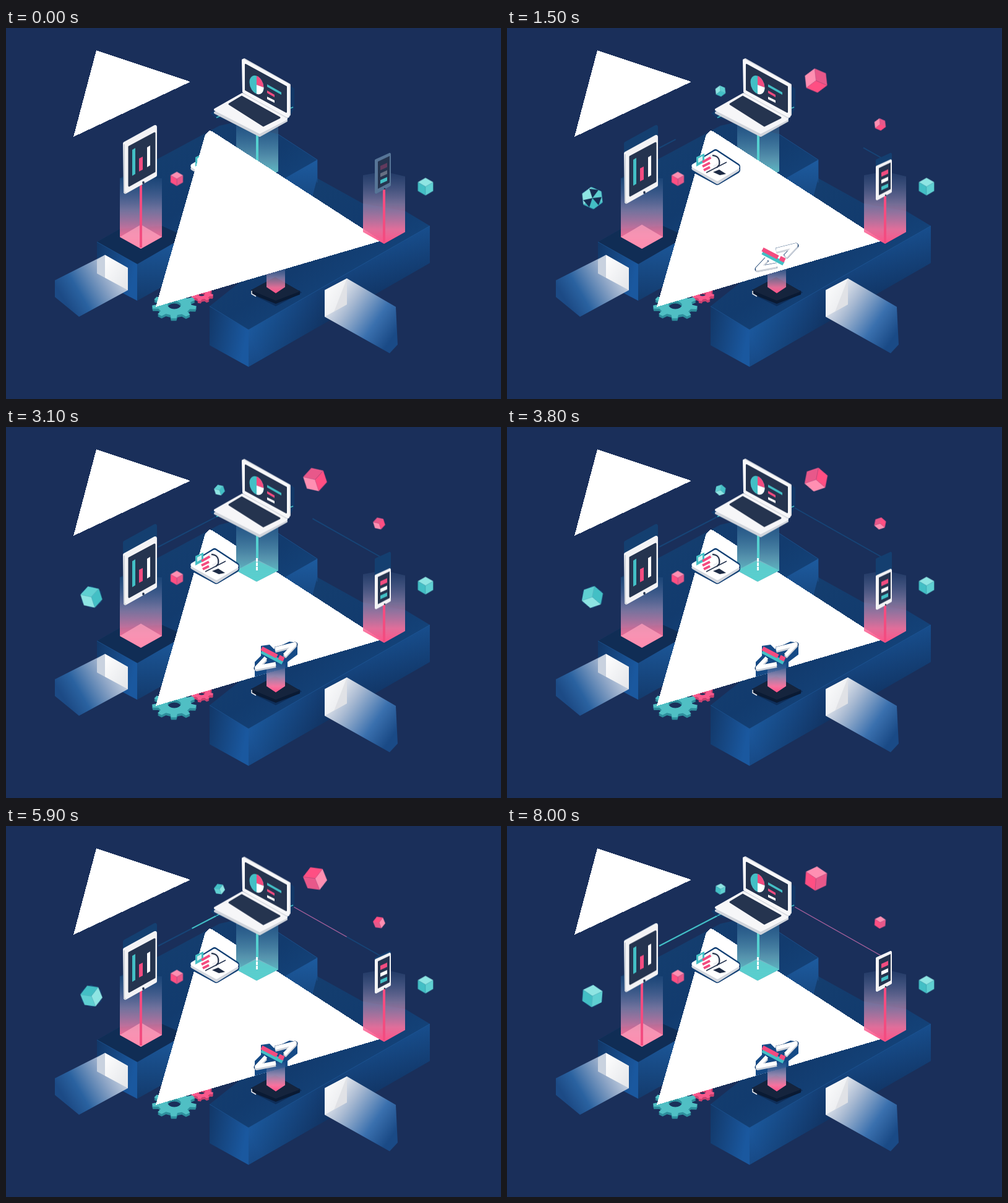
Write an HTML page that moves like this. It is 800 px wide and 600 px high and loops after 8.1 s.

```html
<!DOCTYPE html>
<html lang="en">
<head>
<meta charset="utf-8">
<title>Isometric devices</title>
<style>
html, body { margin: 0; width: 100%; height: 100%; overflow: hidden; background: #1a2f5a; }
svg { display: block; width: 800px; height: 600px; }
.anim { animation: 8100ms linear infinite; }
.step { animation: 8100ms step-end infinite; }

#laptop { animation-name: laptop; }
#tablet { animation-name: tablet; }
#phone { animation-name: phone; }
@keyframes laptop {
  0%, 100% { transform: translateY(0); }
  10% { transform: translateY(-1px); }
  18.5% { transform: translateY(0); }
  29.6% { transform: translateY(2px); }
  40% { transform: translateY(2.8px); }
  46.9% { transform: translateY(2.2px); }
  63% { transform: translateY(-.3px); }
  82.7% { transform: translateY(1.6px); }
  98.8% { transform: translateY(0); }
}
@keyframes tablet {
  0%, 100% { transform: translateY(0); }
  8.6% { transform: translateY(8.5px); }
  18.5% { transform: translateY(16px); }
  29.6% { transform: translateY(19px); }
  38% { transform: translateY(20px); }
  46.9% { transform: translateY(19px); }
  63% { transform: translateY(15.5px); }
  82.7% { transform: translateY(10.5px); }
  98.8% { transform: translateY(.3px); }
}
@keyframes phone {
  0%, 100% { transform: translateY(0); }
  8.6% { transform: translateY(4px); }
  18.5% { transform: translateY(10.5px); }
  29.6% { transform: translateY(21px); }
  38% { transform: translateY(26.5px); }
  46.9% { transform: translateY(27.5px); }
  55% { transform: translateY(18px); }
  63% { transform: translateY(8px); }
  72% { transform: translateY(3px); }
  82.7% { transform: translateY(1px); }
  98.8% { transform: translateY(0); }
}

.spin { animation-name: spin; }
@keyframes spin { to { transform: rotate(-360deg); } }

/* visibility switches */
.late { animation-name: late; }
@keyframes late { 0%, 100% { opacity: 0; } 1.234% { opacity: 1; } }
.dim { animation-name: dim; }
@keyframes dim { 0%, 100% { opacity: .3; } 1.234% { opacity: 1; } }
.tabpole { animation-name: tabpole; }
@keyframes tabpole { 0%, 100% { opacity: 1; } 1.234% { opacity: 0; } 54.3% { opacity: 1; } }
.phonepole { animation-name: phonepole; }
@keyframes phonepole { 0%, 100% { opacity: 1; } 23.4% { opacity: 0; } 34.5% { opacity: 1; } }
.front { animation-name: front; }
@keyframes front { 0%, 100% { opacity: 0; } 34.5% { opacity: 1; } }
.body { animation-name: body; }
@keyframes body { 0%, 100% { opacity: 1; } 56.8% { opacity: 0; } 67.9% { opacity: 1; } }
.halo { animation-name: halo; }
@keyframes halo { 0%, 100% { opacity: 0; } 23.4% { opacity: 1; } }
.wedge { animation-name: wedge; }
@keyframes wedge {
  0%, 100% { transform: scale(.92); }
  23.4% { transform: scale(.72); opacity: 1; }
  34.5% { transform: scale(.72); opacity: 0; }
}

/* connecting lines */
.link { fill: none; stroke-dasharray: 1 2; stroke-dashoffset: 1; }
.trailL { animation-name: trailL; }
@keyframes trailL { 0%, 10.5% { stroke-dashoffset: 1; } 18.5% { stroke-dashoffset: .74; } 29.6% { stroke-dashoffset: .37; } 41%, 100% { stroke-dashoffset: 0; } }
.trailR { animation-name: trailR; }
@keyframes trailR { 0%, 9.5% { stroke-dashoffset: 1; } 18.5% { stroke-dashoffset: .8; } 29.6% { stroke-dashoffset: .56; } 45%, 100% { stroke-dashoffset: 0; } }
.wireL { animation-name: wireL; }
@keyframes wireL { 0%, 58.8% { stroke-dashoffset: 1; } 63% { stroke-dashoffset: .86; } 82.7% { stroke-dashoffset: .21; } 90%, 100% { stroke-dashoffset: 0; } }
.wireR { animation-name: wireR; }
@keyframes wireR { 0%, 46% { stroke-dashoffset: 1; } 63% { stroke-dashoffset: .61; } 82.7% { stroke-dashoffset: .14; } 90%, 100% { stroke-dashoffset: 0; } }

.pink { --a: #ff8fb2; --b: #ff4f83; --c: #e8588a; }
.teal { --a: #8ee5e3; --b: #43bfc5; --c: #5fd0d2; }
</style>
</head>
<body>
<svg viewBox="0 0 800 600">
  <defs>
    <linearGradient id="top" x1="0" y1="0" x2="1" y2="1">
      <stop offset="0" stop-color="#16406f"/><stop offset=".5" stop-color="#123b6e"/><stop offset="1" stop-color="#17518f"/>
    </linearGradient>
    <linearGradient id="side" gradientUnits="userSpaceOnUse" x1="400" y1="510" x2="690" y2="350">
      <stop offset="0" stop-color="#1d5ea6"/><stop offset=".08" stop-color="#195596"/><stop offset=".4" stop-color="#102f5c"/><stop offset=".75" stop-color="#123c70"/><stop offset="1" stop-color="#15457e"/>
    </linearGradient>
    <linearGradient id="long" gradientUnits="userSpaceOnUse" x1="530" y1="395" x2="565" y2="460">
      <stop offset="0" stop-color="#1c5ca3"/><stop offset="1" stop-color="#102e5b"/>
    </linearGradient>
    <linearGradient id="end" x1="0" y1="0" x2="1" y2=".3">
      <stop offset="0" stop-color="#123767"/><stop offset="1" stop-color="#1a589f"/>
    </linearGradient>
    <linearGradient id="back" x1="0" y1="0" x2="0" y2="1">
      <stop offset="0" stop-color="#1d5b9f"/><stop offset="1" stop-color="#133b6d"/>
    </linearGradient>
    <linearGradient id="beamL" gradientUnits="userSpaceOnUse" x1="190" y1="385" x2="95" y2="442">
      <stop offset="0" stop-color="#dfe4ec"/><stop offset=".35" stop-color="#90a7c7"/><stop offset=".75" stop-color="#2a62a0"/><stop offset="1" stop-color="#1c4a85"/>
    </linearGradient>
    <linearGradient id="beamR" gradientUnits="userSpaceOnUse" x1="525" y1="430" x2="625" y2="500">
      <stop offset="0" stop-color="#f0f0f2"/><stop offset=".3" stop-color="#a9bad2"/><stop offset=".7" stop-color="#3a70ae"/><stop offset="1" stop-color="#1a4a86"/>
    </linearGradient>
    <linearGradient id="glowP" x1="0" y1="0" x2="0" y2="1">
      <stop offset="0" stop-color="#5d83b5" stop-opacity=".12"/><stop offset=".45" stop-color="#a58fb6" stop-opacity=".65"/><stop offset=".8" stop-color="#f8739f" stop-opacity=".9"/><stop offset="1" stop-color="#ff5287"/>
    </linearGradient>
    <linearGradient id="glowT" x1="0" y1="0" x2="0" y2="1">
      <stop offset="0" stop-color="#3d78a8" stop-opacity=".35"/><stop offset=".6" stop-color="#67a9bd" stop-opacity=".8"/><stop offset="1" stop-color="#62d6d4"/>
    </linearGradient>
    <linearGradient id="face" x1="0" y1="0" x2="1" y2="1">
      <stop offset="0" stop-color="#fff"/><stop offset="1" stop-color="#e3e5e9"/>
    </linearGradient>

    <g id="cube">
      <path fill="var(--a)" d="M0-10 8.7-5 0 0-8.7-5z"/>
      <path fill="var(--b)" d="M-8.7-5 0 0V10L-8.7 5z"/>
      <path fill="var(--c)" d="M8.7-5 0 0V10L8.7 5z"/>
    </g>

    <g id="pad" stroke-linejoin="round">
      <path d="M302 227 337 204 372 229 340 249z" fill="#d3d7de" stroke="#d3d7de" stroke-width="7"/>
      <path d="M302 223 337 202 372 225 340 244z" fill="#fff" stroke="#fff" stroke-width="7"/>
      <path d="M306 209 319 203V217L306 224z" fill="#43bfc5"/>
      <path d="M309 211 316 207V214L309 218z" fill="#d7f3f3"/>
      <path d="M316 217 330 209M316 224 328 218M318 230 328 225" stroke="#f34c80" stroke-width="4" fill="none"/>
      <path d="M329 209Q338 203 342 212T334 225" fill="none" stroke="#f1f1f4" stroke-width="6"/>
      <path d="M332 206Q345 207 343 221L339 226" fill="none" stroke="#1d2b45" stroke-width="2"/>
      <path d="M322 234 355 217" stroke="#25344f" stroke-width="1.5"/>
      <path d="M333 233 343 229 354 236 344 238z" fill="#1d2b45"/>
    </g>

    <path id="slab" d="M192 187 241 160V238L193 265z" stroke-width="6" stroke-linejoin="round"/>
    <path id="bar" d="M598 214 620 204V254L598 266z" stroke-width="4" stroke-linejoin="round"/>
    <path id="stand" d="M421 382H451V419L436 429 421 419z" fill="url(#glowP)"/>
  </defs>

  <rect width="800" height="600" fill="#1a2f5a"/>

  <!-- platform -->
  <path fill="url(#top)" d="M184 243 252 208 345 158 372 152 440 172 503 213 440 250 212 382 147 346 184 325z"/>
  <path fill="#102d55" d="M147 346 184 325 252 320 290 337 212 382z"/>
  <path fill="url(#end)" d="M147 346 212 382V441L147 407z"/>
  <path fill="url(#back)" d="M212 382 300 331V392L212 441z"/>
  <path fill="url(#back)" d="M503 213V290L400 320V272z"/>
  <path fill="url(#top)" d="M503 243 577 284 645 296 685 320 392 488 329 450 480 330z"/>
  <path fill="url(#long)" d="M392 488 685 320V380L392 548z"/>
  <path fill="url(#side)" opacity=".55" d="M392 488 685 320V380L392 548z"/>
  <path fill="url(#end)" d="M329 450 392 488V548L329 513z"/>
  <path d="M147 346 212 382M329 450 392 488 685 320M440 172 503 213V250" fill="none" stroke="#1d5797" opacity=".7"/>

  <!-- light beams -->
  <path fill="url(#beamL)" d="M160 367 197 388V424L118 467 79 435V408z"/>
  <path fill="#c9d2df" d="M147 375 160 367V404L147 397z"/>
  <path fill="url(#face)" d="M160 367 197 388V424L160 404z"/>
  <path fill="url(#beamR)" d="M515 424 551 405 630 451 633 512 620 526 515 467z"/>
  <path fill="url(#face)" d="M515 424 551 405V447L515 467z"/>
  <path fill="#d9dbe0" opacity=".6" d="M551 405V447L530 459z"/>

  <g id="gears"></g>

  <!-- code stand -->
  <path fill="#0c2850" d="M398 431 436 450 478 428 474 424z" opacity=".7"/>
  <path fill="#0a1a33" d="M396 424 435 403 475 426V431L436 446 396 430z"/>
  <path fill="#15243d" d="M396 424 435 403 475 426 436 441z"/>
  <path d="M397 425V430L404 434" fill="none" stroke="#e9edf3" stroke-width="1.5"/>
  <use href="#stand"/>

  <!-- laptop pillar, behind the sheet -->
  <path fill="url(#glowT)" d="M372 155H440V232L405 250 372 232z"/>
  <path d="M406 170V232" stroke="#55d0d0" stroke-width="4"/>
  <use href="#pad"/>

  <g fill="#fff" shape-rendering="crispEdges">
    <path d="M146 36 298 87 109 176z"/>
    <path d="M322 172 329 166 333 167 607 344 242 451z"/>
  </g>

  <!-- laptop pillar, in front -->
  <g class="step front">
    <path fill="#153f70" d="M372 160H440V232L405 250 372 232z"/>
    <path fill="#d5d7da" d="M372 232 405 214 440 232 405 250z"/>
    <g class="step body">
      <path fill="url(#glowT)" d="M372 155H440V232L405 250 372 232z"/>
      <path fill="#55cfcd" d="M372 232 405 216 440 232 405 250z" opacity=".8"/>
    </g>
    <path d="M406 170V214" stroke="#55d0d0" stroke-width="4"/>
    <path d="M405.500 212V232" stroke="#fff" stroke-width="3" stroke-dasharray="6 1"/>
  </g>

  <!-- pad and code icon over the sheet -->
  <g class="step late">
    <path d="M303 222 337 201 372 224V230L340 249 303 229z" fill="#113f74" stroke="#113f74" stroke-width="10" stroke-linejoin="round"/>
    <use href="#pad"/>
    <g class="step halo">
      <path fill="#154a86" d="M402 404V380L412 370V354L426 352 433 359 458 347 471 349V368L455 380V389z"/>
      <use href="#stand"/>
    </g>
    <g fill="none" stroke-linejoin="round">
      <g id="code">
        <path d="M420 374 405 390 436 384M435 360 467 352 450 370" stroke="#123a6b" stroke-width="9"/>
        <path d="M420 376 405 392 436 386M435 362 467 354 450 372" stroke="#cdd2da" stroke-width="6"/>
        <path d="M420 373 405 389 436 383M435 359 467 351 450 369" stroke="#fff" stroke-width="6"/>
        <path d="M413 363 447 381" stroke="#43bfc5" stroke-width="7"/>
        <path d="M413 358 438 371M441 372 449 376" stroke="#f34c80" stroke-width="7"/>
      </g>
    </g>
  </g>

  <!-- connecting lines -->
  <g stroke-width="2">
    <path class="link anim trailL" pathLength="1" stroke="#174476" d="M246 194 348 141"/>
    <path class="link anim trailR" pathLength="1" stroke="#174476" d="M605 210 460 128"/>
    <path class="link anim wireL" pathLength="1" stroke="#43bfc5" d="M348 141 246 194"/>
    <path class="link anim wireR" pathLength="1" stroke="#b35a93" stroke-width="1.300" d="M460 128 605 210"/>
  </g>

  <!-- tablet -->
  <path fill="url(#glowP)" d="M184 243H252V338L218 357 184 338z"/>
  <path fill="#ffa0bd" opacity=".75" d="M184 338 218 318 252 338 218 357z"/>
  <path class="step tabpole" d="M218 245V355" stroke="#f34c80" stroke-width="4"/>
  <use href="#slab" fill="#143f70" stroke="#143f70"/>
  <g id="tablet" class="anim">
    <use href="#slab" fill="#f3f3f5" stroke="#f3f3f5"/>
    <path d="M191 188V266L194 267" fill="none" stroke="#cfd3da" stroke-width="2"/>
    <path fill="#25344f" stroke="#25344f" stroke-width="3" stroke-linejoin="round" d="M199 192 240 170V232L199 255z"/>
    <path fill="#43bfc5" d="M204 197 209 194V236L204 239z"/>
    <path fill="#f34c80" d="M215 211 221 208V229L215 232z"/>
    <path fill="#fff" d="M228 193 233 190V222L228 225z"/>
    <ellipse cx="222" cy="250" rx="1.800" ry="2.300" fill="#25344f"/>
  </g>

  <!-- phone -->
  <path fill="url(#glowP)" d="M577 238 611 232 645 240V330L611 349 577 330z"/>
  <path class="step phonepole" d="M611 245V347" stroke="#f34c80" stroke-width="4"/>
  <use href="#bar" fill="#143f70" stroke="#143f70"/>
  <g id="phone" class="anim">
    <g class="step dim">
      <use href="#bar" fill="#f3f3f5" stroke="#f3f3f5"/>
    </g>
    <path fill="#25344f" d="M601 216 620 207V250L601 260z"/>
    <g class="step dim">
      <path fill="#f34c80" d="M605 223 616 218V225L605 230z"/>
      <path fill="#fff" d="M605 235 616 230V236L605 241z"/>
    </g>
    <path fill="#43bfc5" d="M605 246 616 241V247L605 252z"/>
    <circle cx="612" cy="260" r="1.300" fill="#25344f"/>
  </g>

  <!-- laptop -->
  <path fill="#123767" d="M330 138 350 125 360 150 340 146zM455 90 466 98V130L455 150z"/>
  <path d="M340 145 351 140M459 130 464 128" stroke="#43bfc5" stroke-width="1.500"/>
  <g id="laptop" class="anim" stroke-linejoin="round">
    <path fill="#d0d4db" stroke="#d0d4db" stroke-width="4" d="M338 137 382 112 453 150 410 174z"/>
    <path fill="#f6f6f8" stroke="#f6f6f8" stroke-width="4" d="M338 132 382 107 453 147 410 169z"/>
    <path fill="#d8dbe1" stroke="#d8dbe1" stroke-width="4" d="M385 51 458 92V140L454 144 385 104z"/>
    <path fill="#f8f8fa" stroke="#f8f8fa" stroke-width="4" d="M383 52 456 92V143L384 103z"/>
    <path fill="#25344f" stroke="#25344f" stroke-width="2" d="M387 59 453 95V136L387 100z"/>
    <path fill="#25344f" stroke="#25344f" stroke-width="3" d="M361 123 381 111 442 145 416 158z"/>
    <g transform="translate(405 92) skewY(20)">
      <ellipse rx="11.500" ry="14.500" fill="#43bfc5"/>
      <path fill="#f34c80" d="M0 0V-14.500A11.500 14.500 0 0 1 11.500 0z"/>
      <path fill="#fff" d="M0 0H11.500A11.500 14.500 0 0 1 0 14.500z"/>
    </g>
    <path fill="#43bfc5" d="M422 91 445 104V108L422 95z"/>
    <path fill="#f34c80" d="M422 101 434 108V112L422 105z"/>
    <path fill="#fff" d="M422 111 434 117V121L422 115z"/>
  </g>

  <!-- cubes -->
  <g transform="translate(276 244) scale(1.150)" class="pink"><use href="#cube"/></g>
  <g transform="translate(678 256.500) scale(1.420)" class="teal"><use href="#cube"/></g>
  <g class="step late">
    <g transform="translate(499.500 85) scale(1.960)" class="pink"><use href="#cube" class="anim spin"/></g>
    <g transform="translate(345 102) scale(.9)" class="teal"><use href="#cube" class="anim spin"/></g>
    <g transform="translate(603 156) scale(1)" class="pink"><use href="#cube" class="anim spin"/></g>
    <g transform="translate(138 275) scale(1.800)" class="teal">
      <path fill="#163c6c" d="M0-10.500 9-5V5L0 10.500-9 5V-5z"/>
      <use href="#cube" class="anim spin"/>
      <path class="step wedge" fill="#172c52" d="M0 0-3-9 6-8zM0 0 9-1 6 7zM0 0-3 9-9 2z"/>
    </g>
  </g>
</svg>
<script>
const NS = 'http://www.w3.org/2000/svg';
const gears = document.getElementById('gears');

function gearPath(cx, cy, r, teeth, hole) {
  const at = (a, k) => (cx + Math.cos(a) * r * k).toFixed(1) + ' ' + (cy + Math.sin(a) * r * k * .6).toFixed(1);
  const pts = [];
  for (let i = 0; i < teeth; i++) {
    [[-.3, .76], [-.17, 1], [.17, 1], [.3, .76]].forEach(([d, k]) =>
      pts.push(at((i + d) / teeth * 2 * Math.PI + .2, k)));
  }
  const rx = r * hole, ry = rx * .6;
  return `M${pts.join('L')}zM${cx - rx} ${cy}a${rx} ${ry} 0 1 0 ${2 * rx} 0a${rx} ${ry} 0 1 0 ${-2 * rx} 0z`;
}

function gear(x, y, r, teeth, light, dark) {
  [[4, dark], [2, dark], [0, light]].forEach(([dy, fill]) => {
    const p = document.createElementNS(NS, 'path');
    p.setAttribute('d', gearPath(x, y + dy, r, teeth, .3));
    p.setAttribute('fill', fill);
    p.setAttribute('fill-rule', 'evenodd');
    gears.append(p);
  });
}

gear(316, 430, 19, 8, '#f9588b', '#c9416f');
gear(272, 448, 36, 9, '#50bfc4', '#2e8f9d');
</script>
</body>
</html>
```
